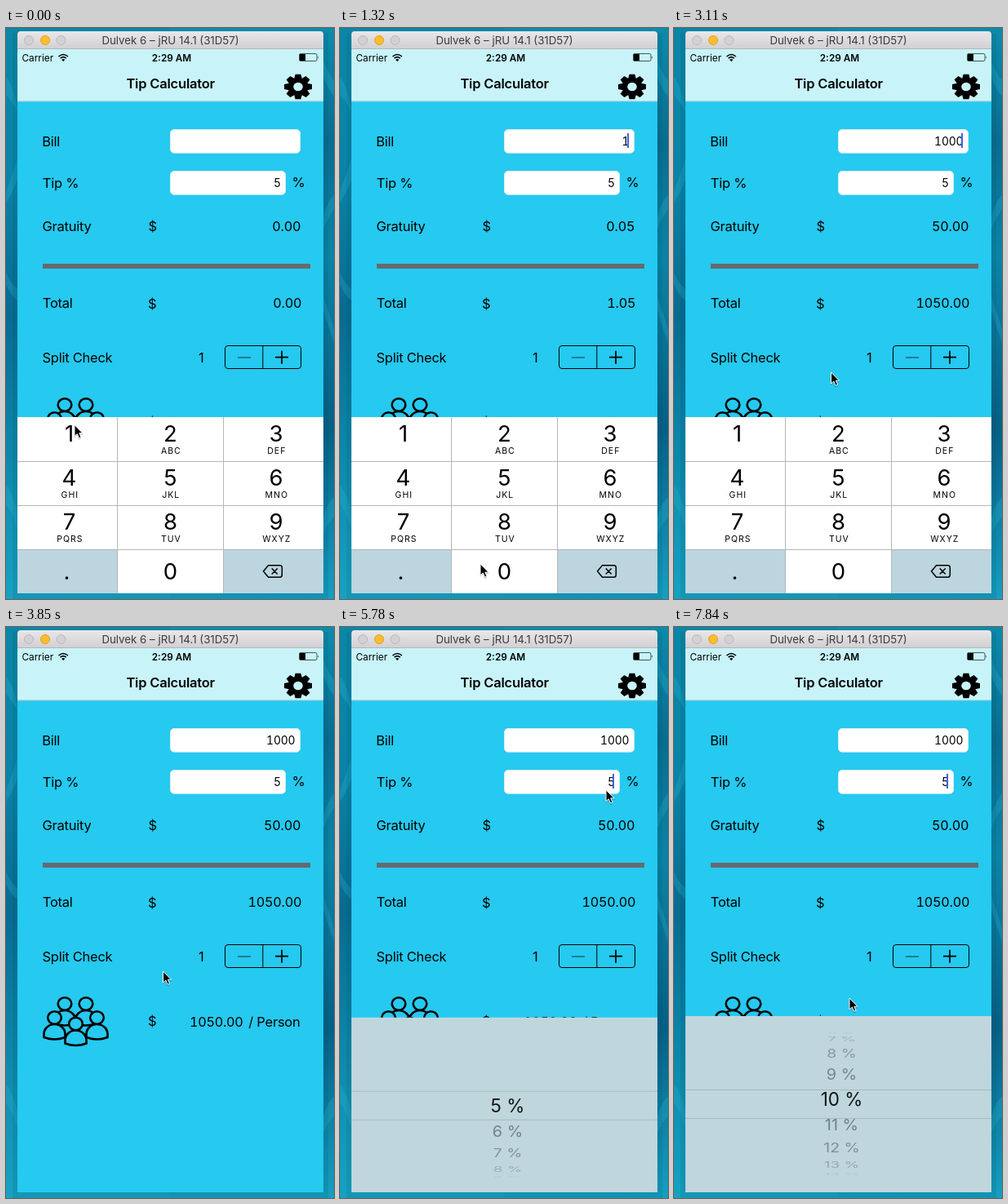
Animation, 402 px wide and 700 px high, one loop 7990 ms. Source, as an HTML page:

```html
<!DOCTYPE html>
<html lang="en">
<head>
<meta charset="utf-8">
<title>Tip Calculator</title>
<style>
  html, body { margin: 0; width: 100%; height: 100%; overflow: hidden; background: #0a7697; }
  svg { display: block; width: 402px; height: 700px; }
  text { font-family: Inter, "Liberation Sans", sans-serif; white-space: pre; }
  .label { font-size: 16.5px; letter-spacing: -.25px; }
  .num { font-size: 16.2px; font-variant-numeric: tabular-nums; }
  .field { font-size: 13.8px; letter-spacing: -.15px; font-variant-numeric: tabular-nums; }
  .end { text-anchor: end; }
  .mid { text-anchor: middle; }
  .digit { font-size: 27.5px; text-anchor: middle; }
  .letters { font-size: 10.5px; letter-spacing: 1px; text-anchor: middle; }
  .line { fill: none; stroke: #000; }
  .row { font-size: 20px; fill: #46545a; text-anchor: middle; }
  .big .row { font-size: 22.5px; fill: #101416; }
</style>
</head>
<body>
<svg viewBox="0 0 402 700">
  <defs>
    <linearGradient id="seaLeft" x2="0" y2="1">
      <stop offset="0" stop-color="#0b86a6"/><stop offset=".25" stop-color="#0a84a8"/>
      <stop offset=".5" stop-color="#086b90"/><stop offset=".7" stop-color="#0b83a6"/>
      <stop offset="1" stop-color="#17a2c2"/>
    </linearGradient>
    <linearGradient id="seaRight" x2="0" y2="1">
      <stop offset="0" stop-color="#0d8bab"/><stop offset=".2" stop-color="#086d90"/>
      <stop offset=".4" stop-color="#0b84a6"/><stop offset=".7" stop-color="#065f84"/>
      <stop offset="1" stop-color="#159fc0"/>
    </linearGradient>
    <linearGradient id="titleBar" x2="0" y2="1">
      <stop offset="0" stop-color="#e9e7e9"/><stop offset="1" stop-color="#d1cfd1"/>
    </linearGradient>
    <clipPath id="screen"><path d="M14 26h375v667H14z"/></clipPath>
    <clipPath id="band"><path d="M14 568h375v34H14z"/></clipPath>
    <clipPath id="offBand"><path d="M14 477h375v91H14zM14 602h375v91H14z"/></clipPath>
  </defs>

  <path fill="url(#seaLeft)" d="M0 0h201v700H0z"/>
  <path fill="url(#seaRight)" d="M201 0h201v700H201z"/>
  <g fill="#2cb4cf" opacity=".28">
    <path d="M0 60q10 12 14 42q-10-16-14-20zM0 200q9-24 14-40v26q-6 16-14 28zM0 300q6 14 14 20v14q-10-8-14-20zM0 560q8 10 14 34v20q-8-24-14-30z"/>
    <path d="M389 40q8 20 13 24v20q-8-10-13-24zM389 230q6-18 13-26v18q-8 12-13 24zM389 330q7 18 13 40v16q-8-24-13-40zM389 600q6-20 13-24v24q-8 8-13 20z"/>
  </g>
  <g fill="#003b55" opacity=".1">
    <path d="M8 6h387v694H8z"/>
    <path d="M12 5h379v692H12z"/>
  </g>

  <path fill="url(#titleBar)" d="M14 26V8q0-4 4-4h367q4 0 4 4v18z"/>
  <path fill="#b4b6b8" d="M14 25h375v1H14z"/>
  <circle cx="28" cy="15" r="5.5" fill="#d3d1d3" stroke="#bab8ba"/>
  <circle cx="48" cy="15" r="5.5" fill="#fdbd2e" stroke="#e0a125"/>
  <circle cx="67.5" cy="15" r="5.5" fill="#d3d1d3" stroke="#bab8ba"/>
  <text class="mid" x="201.5" y="20" font-size="13.3" fill="#3c3a3c">Dulvek 6 – jRU 14.1 (31D57)</text>

  <g clip-path="url(#screen)">
    <path fill="#26c9ef" d="M14 25h375v668H14z"/>
    <path fill="#c8f4f9" d="M14 25h375v65H14z"/>
    <path fill="#8fc3cf" d="M14 89.5h375v1H14z"/>
    <text x="19.5" y="40.5" font-size="11.8">Carrier</text>
    <g class="line" stroke-width="1.6">
      <path d="M64.5 35q5.7-5 11.4 0M66.6 37.2q3.6-3 7.2 0"/>
    </g>
    <path d="M68 38.7q2.2-1.6 4.4 0l-2.2 2.4z"/>
    <text class="mid" x="203" y="40.5" font-size="11.8" font-weight="600">2:29 AM</text>
    <rect class="line" x="359.5" y="31.5" width="21.5" height="9" rx="1.5" stroke-opacity=".65"/>
    <path d="M360 32h7v8h-7zM382 34.5q1.5 1.5 0 3z"/>
    <text class="mid" x="201.7" y="74" font-size="16.5" font-weight="600" letter-spacing="-.2">Tip Calculator</text>
    <g id="gear" transform="translate(358 72) scale(1 .9)"></g>

    <g class="label">
      <text x="44.3" y="145">Bill</text>
      <text x="44.8" y="196">Tip %</text>
      <text x="350.5" y="195">%</text>
      <text x="44.5" y="249">Gratuity</text>
      <text x="174.5" y="249">$</text>
      <text id="gratuity" class="num end" x="361.2" y="249"></text>
      <text x="44.8" y="343">Total</text>
      <text x="174" y="344">$</text>
      <text id="total" class="num end" x="362.2" y="343"></text>
      <text x="44.5" y="410">Split Check</text>
      <text class="end" x="242.5" y="410">1</text>
      <text x="174" y="489">$</text>
      <text id="share" class="num end" x="290.5" y="490"></text>
      <text class="end" x="360.5" y="490">/ Person</text>
    </g>
    <path fill="#666a6e" d="M45 289h328v6H45z"/>
    <g fill="#fff" stroke="#d9eef3">
      <rect x="201.5" y="124.5" width="159" height="28.7" rx="4.5"/>
      <rect x="201.5" y="175.5" width="141" height="28.7" rx="4.5"/>
    </g>
    <text id="bill" class="field end" x="354.3" y="144"></text>
    <text class="field end" x="336.7" y="194.7">5</text>
    <path id="billCaret" fill="#3e62e0" d="M352 129h2v18h-2z"/>
    <path id="tipCaret" fill="#3e62e0" d="M334 180h2v18h-2z"/>
    <rect class="line" x="268.5" y="389.5" width="93" height="28" rx="3.5"/>
    <path class="line" d="M314.8 389.5v28"/>
    <path class="line" opacity=".5" stroke-width="1.5" d="M284 404h16"/>
    <path class="line" stroke-width="1.7" d="M330 403.7h16M338 395.7v16"/>
    <g id="people" fill="#26c9ef" stroke="#000" stroke-width="2.6"></g>

    <g id="pad"></g>
    <g id="picker">
      <path fill="#c0d6dd" d="M14 477h375v219H14z"/>
      <g id="rows" clip-path="url(#offBand)"></g>
      <g id="bigRows" class="big" clip-path="url(#band)"></g>
      <path fill="#a7babf" d="M14 567h375v1H14zM14 602h375v1H14z"/>
    </g>
  </g>
  <g id="cursor">
    <path opacity=".2" d="M-.5 1.5v14.5l3.3-3 2.3 5.2 3-1-2.2-5h5z"/>
    <path stroke="#fff" d="M0 0v14l3.3-3 2.3 5.2 2.4-1-2.2-5h4.2z"/>
  </g>
</svg>
<script>
const $ = id => document.getElementById(id);
const add = (parent, tag, attrs, text = '') => {
  const el = document.createElementNS('http://www.w3.org/2000/svg', tag);
  for (const name in attrs) el.setAttribute(name, attrs[name]);
  el.textContent = text;
  parent.append(el);
  return el;
};
const show = (el, on) => el.setAttribute('visibility', on ? 'visible' : 'hidden');
const slide = (el, y) => el.setAttribute('transform', `translate(0 ${y})`);

// Icons
for (let a = 0; a < 360; a += 45)
  add($('gear'), 'path', { d: 'M-5-10l1.6-7h6.8l1.6 7z', transform: `rotate(${a})` });
add($('gear'), 'circle', { r: 12 });
add($('gear'), 'circle', { r: 5.8, fill: '#c8f4f9' });

for (const [x, y] of [[72, 462], [98, 462], [59.5, 479], [111.5, 479], [85.5, 486.5]]) {
  add($('people'), 'path', { d: `M${x - 13} ${y + 24}v-4a13 12 0 0 1 26 0v4q-13 5 -26 0z` });
  add($('people'), 'ellipse', { cx: x, cy: y, rx: 8.3, ry: 7.7 });
}

// Number pad
const GREY = '#bcd5de', RULE = '#b3b7b9';
const colX = [14, 137, 267], colW = [122, 129, 122], mid = [77.5, 201.5, 331];
const labels = ['', 'ABC', 'DEF', 'GHI', 'JKL', 'MNO', 'PQRS', 'TUV', 'WXYZ'];
const keys = {};
const pad = $('pad');
add(pad, 'path', { d: 'M14 477h375v216H14z', fill: RULE });
['1', '2', '3', '4', '5', '6', '7', '8', '9', '.', '0', ''].forEach((char, i) => {
  const c = i % 3, y = 477 + 54 * Math.floor(i / 3);
  const fill = i === 9 || i === 11 ? GREY : '#fff';
  keys[char] = add(pad, 'rect', { x: colX[c], y, width: colW[c], height: 54, fill });
  add(pad, 'text', { class: 'digit', x: i === 9 ? 74.5 : mid[c], y: y + (i < 9 ? 30 : 37) }, char);
  if (labels[i]) add(pad, 'text', { class: 'letters', x: mid[c] + .8, y: y + 45 }, labels[i]);
});
for (const y of [531, 585, 639]) add(pad, 'path', { d: `M14 ${y}h375v1H14z`, fill: RULE });
add(pad, 'path', {
  class: 'line', 'stroke-width': 1.5,
  d: 'M315.5 666l6-7.2h14q2.8 0 2.8 2.8v8.8q0 2.8-2.8 2.8h-14zM325.7 662.5l7 7M332.7 662.5l-7 7'
});

// Picker wheel
const RADIUS = 87.7, TURN = .361, CENTER = 585;
const rows = [];
for (let v = 5; v < 18; v++)
  rows.push({ v, els: ['rows', 'bigRows'].map((id, big) =>
    add($(id), 'text', { class: 'row', y: big ? 8.2 : 7.3 }, v + ' %')) });

function turnWheel(value) {
  for (const { v, els } of rows) {
    const a = (v - value) * TURN, c = Math.cos(a);
    const seen = Math.abs(a) < 1.52;
    for (const el of els) {
      show(el, seen);
      el.setAttribute('transform',
        `translate(205.5 ${CENTER + RADIUS * Math.sin(a)}) scale(${.9 + .1 * c} ${Math.max(c, .01)})`);
    }
    els[0].setAttribute('opacity', Math.max(.12, .68 * c));
  }
}

// The picture refreshes only at these moments: [first, last, count]
const LOOP = 7990;
const ticks = [0];
for (const [from, to, n] of [[150, 1180, 8], [1320, 1910, 5], [2660, 3110, 4], [3550, 3850, 3],
  [4300, 4740, 4], [5040, 5190, 2], [5780, 6810, 8], [6960, 6960, 1], [7260, 7840, 5]])
  for (let i = 0; i < n; i++) ticks.push(from + (n > 1 ? (to - from) * i / (n - 1) : 0));

// Pointer stops: time, x, y
const stops = [[0, 84, 486.5], [440, 84, 486.5], [1180, 167, 657], [1320, 172, 657], [2560, 172, 657],
  [3110, 192.5, 422], [4170, 192.5, 422], [4740, 309, 216], [4900, 309, 216], [5190, 326, 199.7],
  [5930, 326, 199.7], [6960, 206, 632], [7110, 206, 632], [7840, 215, 455]];

function pointer(t) {
  const i = stops.findIndex(s => s[0] > t);
  if (i < 0) return stops[stops.length - 1].slice(1);
  const [t0, x0, y0] = stops[i - 1], [t1, x1, y1] = stops[i];
  const s = (t - t0) / (t1 - t0), e = s * s * (3 - 2 * s);
  return [x0 + (x1 - x0) * e, y0 + (y1 - y0) * e];
}

const within = (t, a, b) => t >= a && t < b;
const money = n => n.toFixed(2);

function draw(t) {
  const [x, y] = pointer(t);
  $('cursor').setAttribute('transform', `translate(${x} ${y})`);

  const bill = t < 430 ? '' : '1' + '0'.repeat([1610, 1760, 1900].filter(at => t >= at).length);
  $('bill').textContent = bill;
  $('gratuity').textContent = money(bill * .05);
  $('total').textContent = $('share').textContent = money(bill * 1.05);
  show($('billCaret'), within(t, 430, 2660) || within(t, 3110, 3550));
  show($('tipCaret'), within(t, 5780, 6360) || t >= 6960);

  keys[1].setAttribute('fill', within(t, 150, 430) ? GREY : '#fff');
  keys[0].setAttribute('fill', within(t, 1460, 1900) ? GREY : '#fff');
  const gone = Math.min(1, Math.max(0, (t - 3480) / 370));
  show(pad, gone < 1);
  slide(pad, 216 * (1 - (1 - gone) ** 3));

  const open = t >= 5780;
  $('picker').style.display = open ? '' : 'none';
  if (open) {
    slide($('picker'), 1.7 * Math.max(0, 1 - (t - 5780) / 140));
    const drag = t > 7110 ? Math.max(0, 632 - y - 12.5) : 0;
    turnWheel(5 + drag / (RADIUS * TURN));
  }
}

let last = -1;
function frame() {
  const t = performance.now() % LOOP;
  const tick = ticks.filter(at => at <= t + .5).pop();
  if (tick !== last) draw(last = tick);
  requestAnimationFrame(frame);
}
draw(last = 0);
requestAnimationFrame(frame);
</script>
</body>
</html>
```
